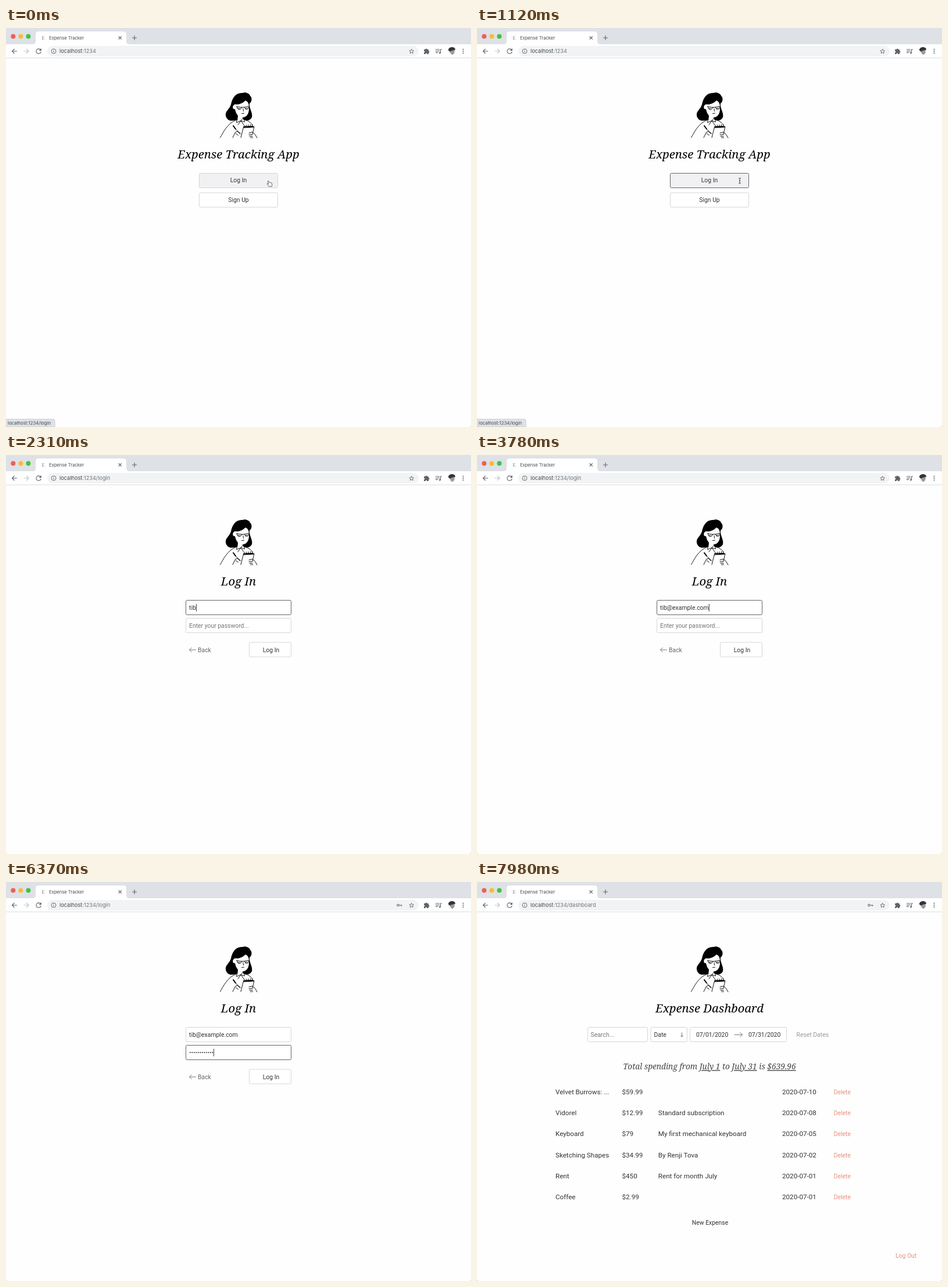
Recreate the animation shown at these times as an HTML page. Size 800 by 688 pixels, loop 8000 ms.

```html
<!DOCTYPE html>
<html lang="en">
<head>
<meta charset="utf-8">
<title>Expense Tracker</title>
<style>
  html, body { margin: 0; width: 100%; height: 100%; overflow: hidden; background: #fff; }
  svg { display: block; width: 800px; height: 688px; }
  text { font: 10.4px Roboto, sans-serif; fill: #333; white-space: pre; }
  .ui { font-family: Inter, sans-serif; fill: #45494d; }
  .tab { font-size: 7.6px; }
  .url { font-size: 9.2px; }
  .tip { font-size: 7.8px; }
  .head { font: italic 20.3px "Noto Serif", serif; fill: #000; }
  .sum { font: italic 13.7px "Noto Serif", serif; fill: #444; }
  .row { font-size: 11.65px; }
  .mid { text-anchor: middle; }
  .dim { fill: #757575; }
  .red { fill: #e8907c; }
  .box { fill: #fff; stroke: #d6d6d8; }
  .ink { fill: none; stroke: #111; stroke-width: 1; stroke-linecap: round; stroke-linejoin: round; }
  .icon { fill: none; stroke: #5f6368; stroke-width: 1.1; }
  .fine { stroke-width: .9; }
  .thin { fill: none; stroke: #666; stroke-width: .9; }
</style>
</head>
<body>
<svg viewBox="0 0 800 688">
  <rect width="800" height="688" fill="#fefefe"/>

  <!-- browser window -->
  <path d="M0 0H800V28H0Z" fill="#dee1e6"/>
  <path d="M0 28H800V51H0Z" fill="#fff"/>
  <path d="M0 51.5H800" stroke="#dcdee1"/>
  <path d="M46 28Q51 28 51 23V11Q51 6 56 6H202Q207 6 207 11V23Q207 28 212 28Z" fill="#fff"/>
  <circle cx="12.3" cy="14.4" r="4" fill="#ee5f56"/>
  <circle cx="25.4" cy="14.4" r="4" fill="#f5bd31"/>
  <circle cx="38.4" cy="14.4" r="4" fill="#3fc346"/>
  <text x="61.5" y="19.6" style="font:8px 'Liberation Serif',serif;fill:#777">E</text>
  <text class="ui tab" x="74" y="19.6">Expense Tracker</text>
  <path class="icon" d="M193.7 14.5l5 5m0-5l-5 5M217 17h8m-4-4v8"/>
  <path class="icon" d="M19 40H10.5m4-4l-4 4l4 4"/>
  <path class="icon" d="M30.5 40H39m-4-4l4 4l-4 4" style="stroke:#bfc2c5"/>
  <path class="icon" d="M59.3 37.3A4.2 4.2 0 1 0 60.2 41"/>
  <path d="M60.8 35v4.3h-4.3z" fill="#5f6368"/>
  <rect x="71" y="31" width="639" height="18" rx="9" fill="#f1f3f4"/>
  <circle class="icon fine" cx="82" cy="40" r="4"/>
  <path class="icon fine" d="M82 39.5v2.7m0-4.7v1"/>
  <text class="ui url" x="92" y="43.2">localhost<tspan id="path" fill="#74787c"></tspan></text>
  <g id="key"><circle class="icon" cx="674.5" cy="40" r="1.8"/><path class="icon" d="M676.5 40h5m-1.3 0v2"/></g>
  <path class="icon fine" d="M697.7 36.4l1.1 2.5 2.7.3-2 1.8.6 2.7-2.4-1.4-2.4 1.4.6-2.7-2-1.8 2.7-.3z"/>
  <path d="M719 37h2.500a1.500 1.500 0 0 1 3 0h2.500v2.500a1.500 1.500 0 0 1 0 3V45h-2.600a1.400 1.400 0 0 0-2.800 0H719v-2.600a1.400 1.400 0 0 0 0-2.800z" fill="#5f6368"/>
  <path class="icon" d="M739 37h7m-7 2.700h7m-7 2.700h4M747.500 43v-6h2.500"/>
  <circle cx="746.500" cy="43" r="1.400" fill="#5f6368"/>
  <circle cx="767" cy="39.500" r="6.500" fill="#eee"/>
  <path d="M764.500 37H771.500V42Q770 46 767 46Q765 44 764.500 42Z" fill="#999"/>
  <path d="M761 38.500C760.500 31.500 773 31.500 773 37.500L765 39.500V41.500Z" fill="#333"/>
  <g fill="#5f6368"><circle cx="786.500" cy="36.700" r="1"/><circle cx="786.500" cy="40" r="1"/><circle cx="786.500" cy="43.300" r="1"/></g>

  <!-- note taker -->
  <g id="lady">
    <path d="M378 151C377 143 384 141 387 132C389 120 396 111 407 112C412 110 419 113 420 117C424 120 423 128 419 130C418 139 425 146 423 154C420 160 413 161 409 158L391 159.500C384 161 379 157 378 151Z"/>
    <path d="M394 131.500C401 133 408 129 412 125C417 127 418.500 132 418 139C418 149 413 154.500 407 154L409 161L404 167L398 161L399 151C396 148 395 144 394 140C389 141 389 133 394 131.500Z" fill="#fff"/>
    <path class="ink" d="M396.500 135.500l9.500 1.500M410 136.500l8.500-1.500M406 137l4-.5M397.500 136q.5 5 4 4.500t4-3.500M410.500 137q1 4 4 3.500t3.500-4.500M408 139l.5 4.500M405.500 147.500l4-.5M399 138.500l3.500.7m9.500-.5l3.500-.7"/>
    <path class="ink" d="M398 154l-1.500 9 7.500-3 5-6 1.500 8-6.500-2m-5 7l5-7 5 7M368.500 189C374 180 380 165 396 158.500M412 158.500Q420 161 423.500 167"/>
    <path d="M408.500 170L427 169L423.500 189H404Z" fill="#fff"/>
    <path class="ink" d="M408.500 171L404 189M427 170L424 183M408.500 172l18-1"/>
    <path d="M408.500 169.500l17.500-.7v2l-17.500 1z"/>
    <path class="ink" d="M409.500 170.500l.5-3m3 2.700l.5-3m3 2.700l.5-3m3 2.700l.5-3m3 2.700l.5-3"/>
    <path d="M389.800 168.600l1.600-1 4.600 6.400-1.600 1z"/>
    <path class="ink" d="M395 174l7 8M390 189l4.500-9 4-2 5 4M395.500 182l4 3M398.500 178.500l4 4M418 181l6-1.500 4.500 4 3.500 6M418 184l6-.5M419 186.500l5 0M420.500 189h4"/>
  </g>

  <g id="home">
    <text class="head mid" x="400" y="225.400">Expense Tracking App</text>
    <rect id="enter" class="box" x="332.500" y="250.500" width="135" height="25" rx="2" style="fill:#f1f1f4"/>
    <text class="mid" x="400" y="266.300">Log In</text>
    <rect class="box" x="332.500" y="284" width="135" height="25" rx="2"/>
    <text class="mid" x="400" y="299.900">Sign Up</text>
  </g>

  <g id="login">
    <text class="head mid" x="400" y="225.400">Log In</text>
    <rect id="mailBox" class="box" x="309.500" y="250.500" width="181" height="25" rx="2"/>
    <text id="mail" x="315" y="266.800"></text>
    <rect id="passBox" class="box" x="309.500" y="281.500" width="181" height="25" rx="2"/>
    <text id="hint" class="dim" x="315" y="298">Enter your password...</text>
    <g id="dots"></g>
    <path id="caret" d="M0 0v13" stroke="#222" stroke-width=".9"/>
    <path class="thin" d="M327 336H315.500m4-4l-4 4l4 4"/>
    <text x="330" y="339.700" style="fill:#666">Back</text>
    <rect class="box" x="418.500" y="323" width="72" height="25" rx="2"/>
    <text class="mid" x="456" y="339.700">Log In</text>
  </g>

  <g id="bones" fill="#f2f2f2"><path d="M365 193h74v75h-74z"/></g>

  <g id="dash">
    <text class="head mid" x="400" y="225.400">Expense Dashboard</text>
    <rect class="box" x="190.500" y="250.500" width="103" height="25" rx="2"/>
    <text class="dim" x="195.500" y="267">Search...</text>
    <rect class="box" x="299" y="250.500" width="62.500" height="25" rx="2"/>
    <text x="304.500" y="267">Date</text>
    <path class="thin" d="M352.500 259.500v7.500m-2.500-2.500l2.500 2.500l2.500-2.500"/>
    <rect class="box" x="366.500" y="250.500" width="166" height="25" rx="2"/>
    <text x="377" y="267">07/01/2020</text>
    <path class="thin" d="M442.500 263.300H456.500m-4-4l4 4l-4 4"/>
    <text x="467" y="267">07/31/2020</text>
    <text x="549.500" y="267" style="fill:#999">Reset Dates</text>
    <text class="sum mid" x="400" y="323.300">Total spending from <tspan text-decoration="underline">July 1</tspan> to <tspan text-decoration="underline">July 31</tspan> is <tspan text-decoration="underline">$639.96</tspan></text>
    <g id="rows"></g>
    <text class="mid" x="401" y="590.700">New Expense</text>
    <text class="red" x="720" y="648">Log Out</text>
  </g>

  <g id="status">
    <path id="bubble" fill="#dee1e6" stroke="#c3c6ca" stroke-width=".8"/>
    <text id="tip" class="ui tip" x="3" y="684"></text>
  </g>

  <path id="hand" d="M450.300 264.200q1-1.200 1.800.2l1 2.300q.8-.8 1.500.1q.9-.6 1.400.3q1-.2 1.400 1l.4 2.200q0 1.500-.8 2.900h-4.600q-1-2-3-3.700q-.6-1.200.9-1l1.200.7z" fill="#fff" stroke="#444" stroke-width=".9" stroke-linejoin="round"/>
  <path id="beam" d="M450 258.700q2 0 2 1.300q0-1.300 2-1.300M452 260v6.800M450 268q2 0 2-1.300q0 1.300 2 1.300M451 263.500h2" fill="none" stroke="#333" stroke-width=".9"/>
  <path d="M0 685Q0 688 3 688H0ZM800 685Q800 688 797 688H800Z" fill="#c4c6c9"/>
</svg>
<script>
const LOOP = 8000, NS = "http://www.w3.org/2000/svg";
const $ = id => document.getElementById(id);

// when each key lands
const mailText = "tib@example.com";
const mailKeys = [2030, 2170, 2310, 2520, 2800, 2870, 2940, 3010, 3150, 3220, 3290, 3430, 3640, 3710, 3780];
const passKeys = [4200, 4340, 4480, 4620, 4760, 4830, 4900, 5040, 5110, 5180, 5250, 5390];
const at = { press: 910, beam: 1050, login: 1190, focus: 1470, tab: 3920, load: 7280, ready: 7630 };

const spending = [
  ["Velvet Burrows: ...", "$59.99", "", "10"],
  ["Vidorel", "$12.99", "Standard subscription", "08"],
  ["Keyboard", "$79", "My first mechanical keyboard", "05"],
  ["Sketching Shapes", "$34.99", "By Renji Tova", "02"],
  ["Rent", "$450", "Rent for month July", "01"],
  ["Coffee", "$2.99", "", "01"]
];

function add(parent, tag, attrs, text) {
  const el = document.createElementNS(NS, tag);
  for (const k in attrs) el.setAttribute(k, attrs[k]);
  if (text) el.textContent = text;
  return $(parent).appendChild(el);
}

spending.forEach(([name, cost, note, day], i) => {
  const y = 365.8 + i * 36.3;
  const cell = (x, text, cls = "row") => add("rows", "text", { x, y, class: cls }, text);
  cell(135, name);
  cell(249.5, cost);
  cell(311.8, note);
  cell(525, "2020-07-" + day);
  cell(613.7, "Delete", "red");
});

for (let i = 0; i < 5; i++) {
  const y = 284 + i * 31.25;
  add("bones", "rect", { x: 285, y, width: 46, height: 20 });
  add("bones", "rect", { x: 337, y, width: 182, height: 20 });
}

const dots = passKeys.map((_, i) => add("dots", "circle", { cx: 316.8 + 3.5 * i, cy: 294, r: 1.05, fill: "#333" }));

const show = (id, on) => $(id).style.display = on ? "" : "none";
const typed = (keys, t) => keys.filter(k => k <= t).length;
const ramp = (t, start) => Math.min(1, Math.max(0, (t - start) / 140));

function border(id, amount) {
  const v = Math.round(214 - 114 * amount);
  $(id).style.stroke = `rgb(${v},${v},${v})`;
}

function render(t) {
  const login = t >= at.login && t < at.load;
  const waiting = t >= at.load && t < at.ready;
  show("home", t < at.login);
  show("login", login);
  show("bones", waiting);
  show("dash", t >= at.ready);
  show("lady", !waiting);
  show("key", t >= passKeys[0]);
  show("hand", t < at.beam);
  show("beam", t >= at.beam && t < mailKeys[0]);
  show("status", t < at.focus || waiting);
  $("path").textContent = ":1234" + (t < at.login ? "" : login ? "/login" : "/dashboard");
  $("tip").textContent = waiting ? "Waiting for www.googleapis.com..." : "localhost:1234/login";
  $("bubble").setAttribute("d", `M0 674.4H${waiting ? 263 : 81}q3 0 3 3V688H0Z`);

  border("enter", ramp(t, at.press));
  border("mailBox", ramp(t, at.focus) - ramp(t, at.tab));
  border("passBox", ramp(t, at.tab));

  const n = typed(mailKeys, t), p = typed(passKeys, t);
  $("mail").textContent = n ? mailText.slice(0, n) : "Enter your email...";
  $("mail").setAttribute("class", n ? "" : "dim");
  show("hint", !p);
  dots.forEach((d, i) => d.style.display = i < p ? "" : "none");
  show("caret", t >= at.focus);
  if (login) {
    const inPass = t >= at.tab;
    const x = inPass ? 315.5 + 3.5 * p : 315.7 + (n ? $("mail").getComputedTextLength() : 0);
    $("caret").setAttribute("transform", `translate(${x} ${inPass ? 287.5 : 256.8})`);
  }
}

const start = performance.now();
function tick() {
  render((performance.now() - start) % LOOP);
  requestAnimationFrame(tick);
}
tick();
</script>
</body>
</html>
```
